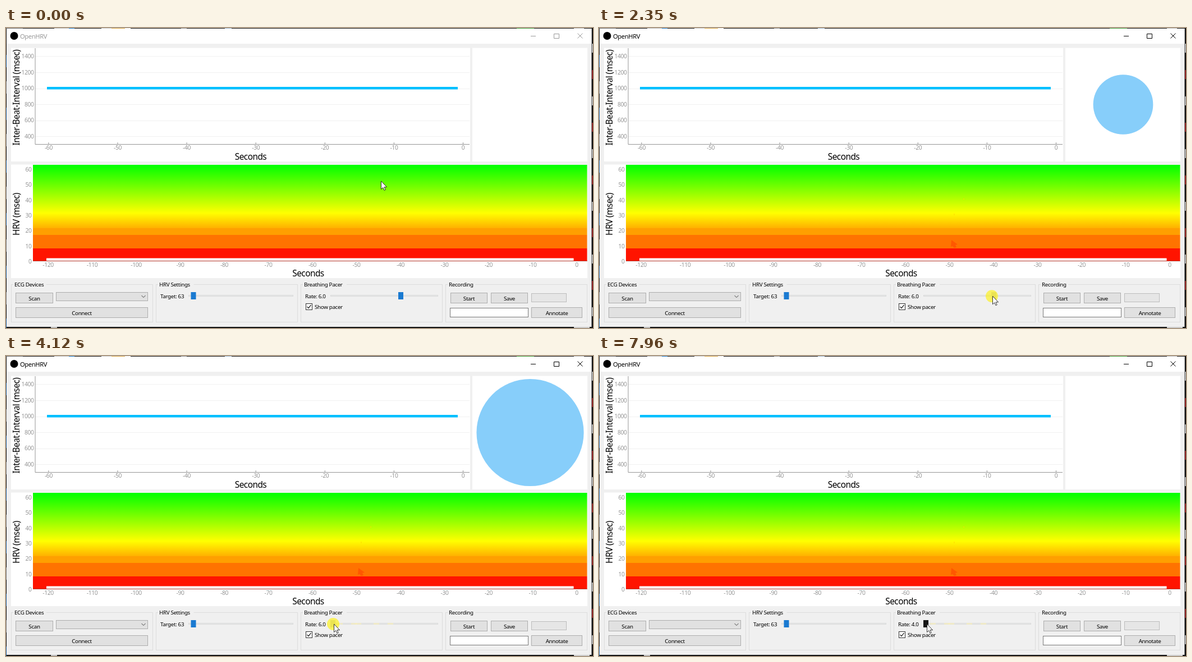
Recreate the animation shown at these times as an HTML page. Size 1046 by 535 pixels, loop 8 s.

```html
<!DOCTYPE html>
<html>
<head>
<meta charset="utf-8">
<style>
html, body { margin: 0; width: 100%; height: 100%; overflow: hidden; background: #000; }
svg { display: block; }
text { font: 9.8px "Noto Sans", "Open Sans", sans-serif; letter-spacing: -.035em; white-space: pre; }
.tick { font-size: 10.3px; fill: #969696; }
.axis { font-size: 15.4px; }
.title { font-size: 11.2px; }
</style>
</head>
<body>
<svg id="stage" width="1046" height="535" viewBox="0 0 1046 535"></svg>
<script>
const LOOP = 8000, ACTIVATE = 2350, RELEASE = 4180;
const stage = document.getElementById('stage');
const $ = id => document.getElementById(id);

const rect = (x, y, x2, y2, fill, extra = '') =>
  `<rect x="${x}" y="${y}" width="${x2 - x}" height="${y2 - y}" fill="${fill}" ${extra}/>`;
const text = (x, y, s, cls = '', anchor = 'start', extra = '') =>
  `<text x="${x}" y="${y}" class="${cls}" text-anchor="${anchor}" ${extra}>${s}</text>`;
const path = (d, stroke, extra = '') => `<path d="${d}" fill="none" stroke="${stroke}" ${extra}/>`;
const box = (x, y, x2, y2, fill, stroke) =>
  rect(x + .5, y + .5, x2 - .5, y2 - .5, fill, `stroke="${stroke}"`);
const button = (x, y, x2, y2, label) =>
  box(x, y, x2, y2, '#e1e1e1', '#adadad') + text((x + x2) / 2, y + 14, label, '', 'middle');
const groove = (x, x2) => box(x, 476, x2, 479, '#e7eaea', '#dadada');
const upright = (y, s) => text(0, 0, s, 'axis', 'middle', `transform="translate(24 ${y}) rotate(-90)"`);
const range = (from, to, step, fn) => {
  let out = '';
  for (let v = from; v <= to; v += step) out += fn(v);
  return out;
};

function desktop() {
  const patches = [[0, 30, '#666'], [86, 112, '#bbb'], [112, 122, '#1673c2'], [170, 188, '#ccc'],
    [188, 212, '#d9a441'], [212, 222, '#eee'], [312, 322, '#888'], [390, 402, '#9bb4cc'],
    [910, 941, '#3c9b35'], [1012, 1030, '#bbb']];
  return rect(0, 0, 1046, 535, '#111') +
    patches.map(([a, b, c]) => rect(a, 0, b, 1, c)).join('') +
    rect(80, 533, 91, 535, '#bbb') + rect(1012, 533, 1040, 535, '#ccc') +
    range(28, 500, 47, y => rect(1044, y, 1046, y + 16, y % 2 ? '#8c2020' : '#aaa') +
      rect(0, y + 20, 1, y + 42, y % 2 ? '#777' : '#1d5f9c'));
}

function frame() {
  return rect(1, 1, 1043.5, 533, '#f0f0f0') + rect(1, 1, 1043.5, 28, '#fff') +
    '<circle cx="14.5" cy="14" r="7" fill="#000"/>' +
    '<g id="caption">' + text(25, 18.5, 'OpenHRV', 'title') +
    path('M935 14.5H944M976.5 10.5H985.5V18.5H976.5ZM1018.5 9.5L1027.5 18.5M1027.5 9.5L1018.5 18.5', 'currentColor') +
    '</g>';
}

function intervalPlot() {
  const x = s => 814.5 + s * 12.31, y = v => 107.5 - (v - 1000) * .1428;
  return rect(9, 35.5, 827, 238, '#fff') +
    range(400, 1400, 200, v => path(`M52 ${Math.round(y(v)) + .5}H826`, '#f1f1f1') +
      text(49.5, y(v) + 3.8, v, 'tick', 'end')) +
    range(-60, 0, 10, s => path(`M${x(s)} 204V207`, '#969696') + text(x(s), 217, s, 'tick', 'middle')) +
    path('M52 36V207.5H826', '#969696') +
    path('M73 107.3H805', '#00bfff', 'stroke-width="4.4"') +
    text(436, 235, 'Seconds', 'axis', 'middle') + upright(124, 'Inter-Beat-Interval (msec)');
}

function hrvPlot() {
  const x = s => 1017 + s * 7.85, y = v => 416 - v * 2.73;
  const stops = [[244, '#0f0'], [330, '#ff0'], [357, '#ffb000'], [357, '#ff9f00'], [369, '#ff9f00'],
    [369, '#ff7300'], [392.5, '#ff7300'], [392.5, '#ff1400'], [416, '#ff1400']];
  return rect(9, 243.5, 1036, 446, '#fff') +
    '<linearGradient id="heat" x2="0" y2="1">' +
    stops.map(([py, c]) => `<stop offset="${(py - 244) / 172}" stop-color="${c}"/>`).join('') +
    '</linearGradient>' + rect(48, 244, 1035.5, 416, 'url(#heat)') +
    rect(72, 410.5, 1011.5, 415, '#fff') +
    path('M48 415.5H1035.5', '#a04038', 'stroke-width=".8"') +
    range(0, 60, 10, v => text(45.5, y(v) + 3.8, v, 'tick', 'end')) +
    range(-120, 0, 10, s => text(x(s), 426, s, 'tick', 'middle')) +
    text(538.5, 443, 'Seconds', 'axis', 'middle') + upright(332, 'HRV (msec)') +
    '<g id="smear"><path d="M628 378L639 386L635 387L637 391L633 392L630 389L627 390Z" fill="#ff4d00" opacity=".75"/>' +
    '<path d="M632 331h2v3h-2zM649 304h2v2h-2z" fill="#ffd800" opacity=".5"/></g>';
}

function controls() {
  const groups = ['ECG Devices', 'HRV Settings', 'Breathing Pacer', 'Recording'];
  return groups.map((name, i) => {
    const x = 9 + 258 * i;
    return box(x, 457, x + 253, 525, 'none', '#dcdcdc') +
      rect(x + 4, 455, x + 10 + name.length * 4.8, 460, '#f0f0f0') + text(x + 6, 461, name);
  }).join('') +
    button(17, 472, 84, 491, 'Scan') + button(17, 498, 253, 517, 'Connect') +
    box(89, 471, 253, 487, '#e1e1e1', '#adadad') + path('M241.5 477L245 480.5L248.5 477', '#444') +
    text(275, 482, 'Target: 63') + groove(325, 512) + rect(329.5, 471, 338.5, 484, '#1a7ad1') +
    text(533, 482, 'Rate: 6.0', '', 'start', 'id="rate"') + groove(578, 770) +
    '<g id="trail">' + [590, 615, 623, 655, 680].map(x => rect(x, 476, x + 10, 479, '#fff3b0', 'opacity=".5"')).join('') + '</g>' +
    rect(-4.5, 471, 4.5, 484, '#000', 'id="handle"') +
    box(534, 491, 546, 503, '#fff', '#333') + path('M536.5 497L539 499.5L543.5 494', '#222', 'stroke-width="1.2"') +
    text(550, 500.5, 'Show pacer') +
    button(792, 472, 858, 491, 'Start') + button(864, 472, 930, 491, 'Save') +
    box(936, 473, 999, 489, '#e6e6e6', '#bcbcbc') + box(791, 499, 931, 516, '#fff', '#7a7a7a') +
    button(936, 498, 1027, 517, 'Annotate');
}

stage.innerHTML = desktop() + frame() + intervalPlot() +
  rect(831, 35.5, 1036, 238, '#fff') + '<circle id="pacer" cx="934" cy="136.5" fill="#87cefa"/>' +
  hrvPlot() + controls() +
  '<circle id="press" r="11" fill="#fff200" opacity=".6"/>' +
  '<path id="cursor" d="M.5 0V14.5L3.8 11.5L6 16.5L8.2 15.5L6 10.7H10.5Z" fill="#fff" stroke="#222" stroke-width=".9"/>';

// time, x and y of the pointer tip
const route = [[0, 668, 273], [110, 668, 273], [500, 628, 378], [900, 650, 446], [1300, 695, 483],
  [1720, 701, 479], [2500, 701, 478], [2920, 685, 474], [3180, 655, 475], [3540, 599, 478],
  [3780, 584, 478], [LOOP, 584, 478]];

function pointer(t) {
  const i = route.findIndex(p => p[0] > t);
  const [t0, x0, y0] = route[i - 1], [t1, x1, y1] = route[i];
  const k = (t - t0) / (t1 - t0);
  return [x0 + (x1 - x0) * k, y0 + (y1 - y0) * k];
}

// Breathing curve, refreshed about eight times a second; the new rate shifts its phase.
function radius(t) {
  const q = 4475 + Math.floor((t - 4475) / 123.5) * 123.5;
  const phase = t < RELEASE ? (q + 390) / 10000 : (8450 - q) / 15000;
  return 98 * Math.sin(Math.PI * phase) ** 2;
}

function draw(t) {
  const [x, y] = pointer(t);
  const active = t >= ACTIVATE, pressed = active && t < RELEASE;
  const snapped = active ? Math.max(0, Math.round((x - 584) / 30.25)) : 4;
  const r = radius(t);
  const show = (id, on) => $(id).setAttribute('visibility', on ? 'visible' : 'hidden');

  $('pacer').setAttribute('r', r < 1.15 ? 0 : r);
  $('cursor').setAttribute('transform', `translate(${x} ${y})`);
  $('press').setAttribute('transform', `translate(${x - 1} ${y})`);
  $('handle').setAttribute('transform', `translate(${582.5 + 30.25 * snapped} 0)`);
  $('handle').setAttribute('fill', pressed ? '#ccc' : t < 1300 ? '#1a7ad1' : '#171717');
  $('rate').textContent = t < RELEASE ? 'Rate: 6.0' : 'Rate: 4.0';
  $('caption').setAttribute('fill', active ? '#000' : '#999');
  $('caption').setAttribute('color', active ? '#000' : '#999');
  show('press', pressed);
  show('smear', t > 540);
  show('trail', t > 3500);
}

const start = performance.now();
function tick() {
  draw((performance.now() - start) % LOOP);
  requestAnimationFrame(tick);
}
tick();
</script>
</body>
</html>
```
